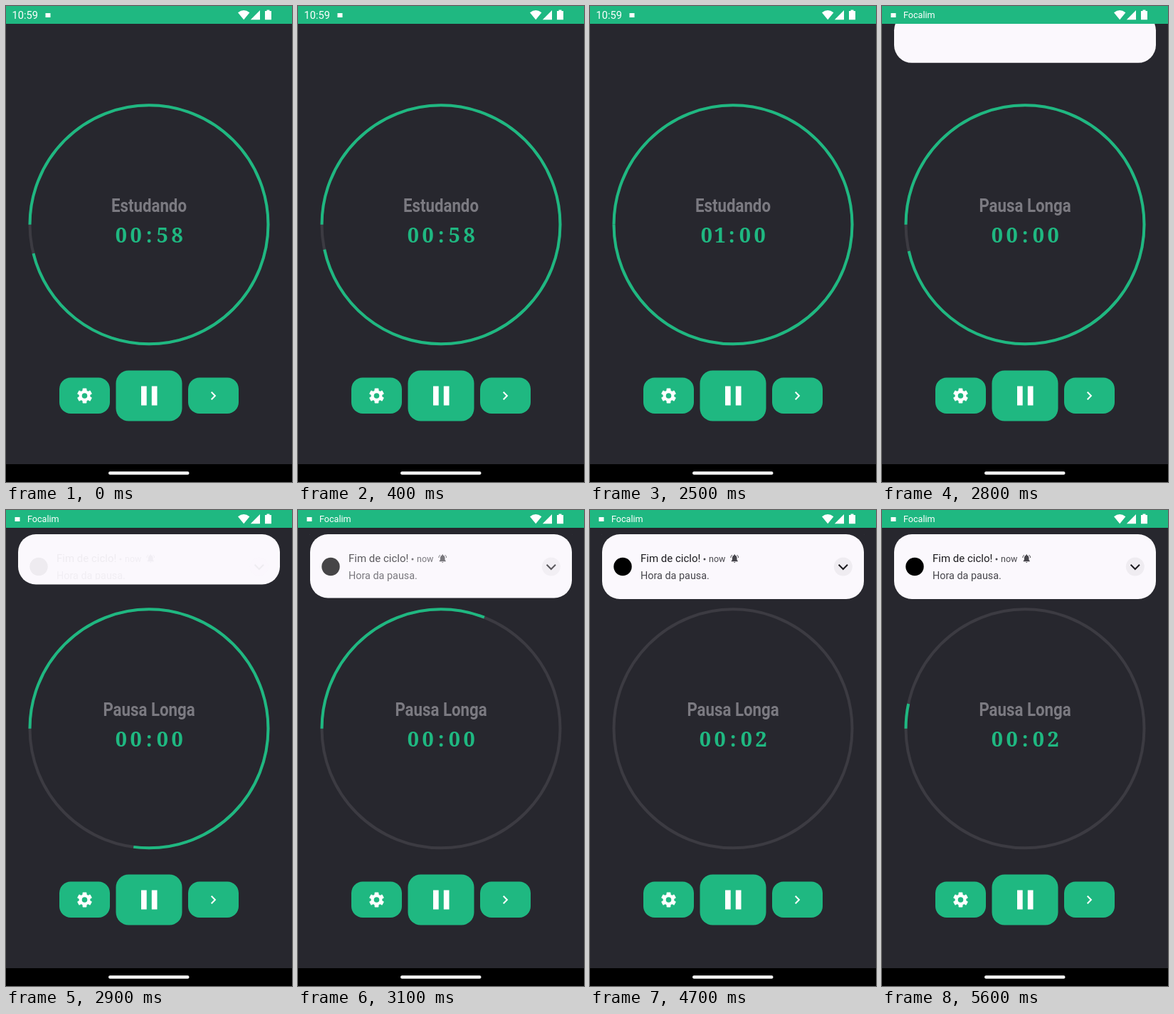
An HTML page for the animation above (5.8 s loop, 402 by 668 pixels).

```html
<!DOCTYPE html>
<html lang="pt">
<head>
<meta charset="utf-8">
<title>Temporizador</title>
<style>
  html, body { margin: 0; width: 100%; height: 100%; overflow: hidden; background: #27272e; }
  svg { display: block; width: 402px; height: 668px; font-family: Roboto, sans-serif; }
  .green { fill: #1fb881; }
  .white { fill: #fff; }
  .ring { fill: none; stroke-width: 4; }
  .line { fill: none; stroke-width: 2; }
  #label { font-weight: 700; font-size: 25px; fill: #7b7a81; text-anchor: middle; }
  #clock { font: 700 29px "Noto Serif", serif; letter-spacing: 4.6px; text-anchor: middle; }
  #clock .one { letter-spacing: 2.6px; }
  #clock .colon { letter-spacing: 6px; }
</style>
</head>
<body>
<svg viewBox="0 0 402 668">
  <defs>
    <clipPath id="clip"><rect id="clipBox" x="17" y="34" width="368" height="91"/></clipPath>
  </defs>
  <rect width="402" height="668" fill="#27272e"/>

  <!-- timer -->
  <circle class="ring" cx="201" cy="306.8" r="167.5" stroke="#3c3b42"/>
  <circle id="arc" class="ring" cx="201" cy="306.8" r="167.5" stroke="#1fb881"
    pathLength="360" transform="rotate(180 201 306.8)"/>
  <!-- condensed face -->
  <g transform="translate(201 289) scale(.89 1)"><text id="label"></text></g>
  <text id="clock" class="green" x="203.5" y="332"></text>

  <!-- buttons -->
  <g class="green">
    <rect x="75" y="521.5" width="71" height="50.5" rx="16"/>
    <rect x="154.5" y="511.5" width="93" height="71" rx="18"/>
    <rect x="256" y="521.5" width="71" height="50.5" rx="16"/>
  </g>
  <g transform="translate(110.5 547)">
    <g class="white">
      <rect id="tooth" x="-2.9" y="-10.5" width="5.8" height="21" rx="1"/>
      <use href="#tooth" transform="rotate(60)"/>
      <use href="#tooth" transform="rotate(120)"/>
      <circle r="7.9"/>
    </g>
    <circle class="green" r="3.8"/>
  </g>
  <path class="white" d="M190 533.5h7.7v27H190zM204.8 533.5h7.7v27h-7.7z"/>
  <path class="line" stroke="#fff" d="M288.7 541.8l5.2 5.2-5.2 5.2"/>

  <!-- notification -->
  <g id="card">
    <rect id="panel" x="17" y="34" width="368" height="91" rx="25" fill="#fbf8fd"/>
    <g clip-path="url(#clip)"><g id="message">
      <circle cx="46" cy="79.5" r="12.7"/>
      <text x="71" y="73" font-size="15" fill="#1c1b1f">Fim de ciclo!</text>
      <circle cx="161" cy="69" r="1.5" fill="#47464c"/>
      <text x="167" y="73" font-size="12.5" fill="#47464c">now</text>
      <g fill="#47464c">
        <path d="M198.7 72.3v-1l1.2-1.2v-3q0-3 2.5-3.7v-.6q.8-1 1.6 0v.6q2.5.7 2.5 3.7v3l1.2 1.2v1zM202 73h2.4q-1.2 2.2-2.4 0z"/>
        <path fill="none" stroke="#47464c" d="M197.8 67q.1-2.500 2-4M208.600 67q-.1-2.500-2-4"/>
      </g>
      <text x="71" y="97" font-size="14.4" fill="#47464c">Hora da pausa.</text>
      <circle cx="355.800" cy="79.500" r="13" fill="#efecf1"/>
      <path class="line" stroke="#1c1b1f" d="M349.600 76.800l6.200 6.200 6.200-6.200"/>
    </g></g>
  </g>

  <!-- system bars -->
  <rect class="green" width="402" height="25"/>
  <g class="white">
    <g id="timeStatus">
      <text x="8.500" y="18" font-size="14.600">10:59</text>
      <rect x="55.500" y="10" width="7" height="6"/>
    </g>
    <g id="appStatus">
      <rect x="12.500" y="10" width="7" height="6"/>
      <text x="30" y="17.300" font-size="12.600">Focalim</text>
    </g>
    <path d="M326 9.300q8.200-6.800 16.400 0L334.200 19.200zM357 6v13.200h-13.200z"/>
    <path d="M366.500 5.500h4v1.500h2.500v12.200h-9V7h2.500z"/>
  </g>
  <rect y="643" width="402" height="25"/>
  <rect x="144" y="653.300" width="113.500" height="4.500" rx="2.250" fill="#f4f4f4"/>
</svg>

<script>
const LOOP = 5800, STEP = 100;
const NOTICE = 2700;            // the study cycle ends
const SWEEP = 850, DELAY = 55;  // ring easing after each tick

// tick time, ring degrees before and after, clock
const ticks = [
  [-385, 342, 348, '00:58'],
  [700, 348, 354, '00:59'],
  [1700, 354, 360, '01:00'],
  [NOTICE, 360, 0, '00:00'],
  [3700, 0, 0, '00:01'],
  [4700, 0, 12, '00:02'],
];

const $ = id => document.getElementById(id);
const show = (id, on) => $(id).setAttribute('visibility', on ? 'visible' : 'hidden');
const ramp = (t, from, to) => Math.min(1, Math.max(0, (t - from) / (to - from)));

// cubic-bezier(.25, .1, .25, 1)
function ease(x) {
  let lo = 0, hi = 1, u;
  for (let i = 0; i < 20; i++) {
    u = (lo + hi) / 2;
    if (.75 * u * (1 - u) + u ** 3 < x) lo = u; else hi = u;
  }
  return .3 * u * (1 - u) ** 2 + 3 * u * u * (1 - u) + u ** 3;
}

const clockMarkup = text => text
  .replace(/1/g, '<tspan class="one" dx="-2">1</tspan>')
  .replace(/:/g, '<tspan class="colon" dx="1.5">:</tspan>');

let shown;
function draw(t) {
  const [at, from, to, clock] = ticks.findLast(tick => tick[0] <= t);
  const angle = from + (to - from) * ease(ramp(t, at + DELAY, at + DELAY + SWEEP));
  $('arc').setAttribute('stroke-dasharray', `${angle} 400`);
  if (clock !== shown) $('clock').innerHTML = clockMarkup(shown = clock);

  const ended = t >= NOTICE;
  $('label').textContent = ended ? 'Pausa Longa' : 'Estudando';
  show('timeStatus', !ended);
  show('appStatus', ended);
  show('card', ended);

  const height = 70.5 + 20.5 * ease(ramp(t, 2900, 3200));
  const drop = 125 * (ease(ramp(t, NOTICE, 2900)) - 1);
  $('card').setAttribute('transform', `translate(0 ${drop})`);
  $('panel').setAttribute('height', height);
  $('clipBox').setAttribute('height', height - 7 * (1 - ramp(t, 2900, 3200)));
  $('message').setAttribute('opacity', ramp(t, 2885, 3185));
}

const start = performance.now();
function frame() {
  const t = (performance.now() - start) % LOOP;
  draw(Math.floor(t / STEP) * STEP);
  requestAnimationFrame(frame);
}
frame();
</script>
</body>
</html>
```
